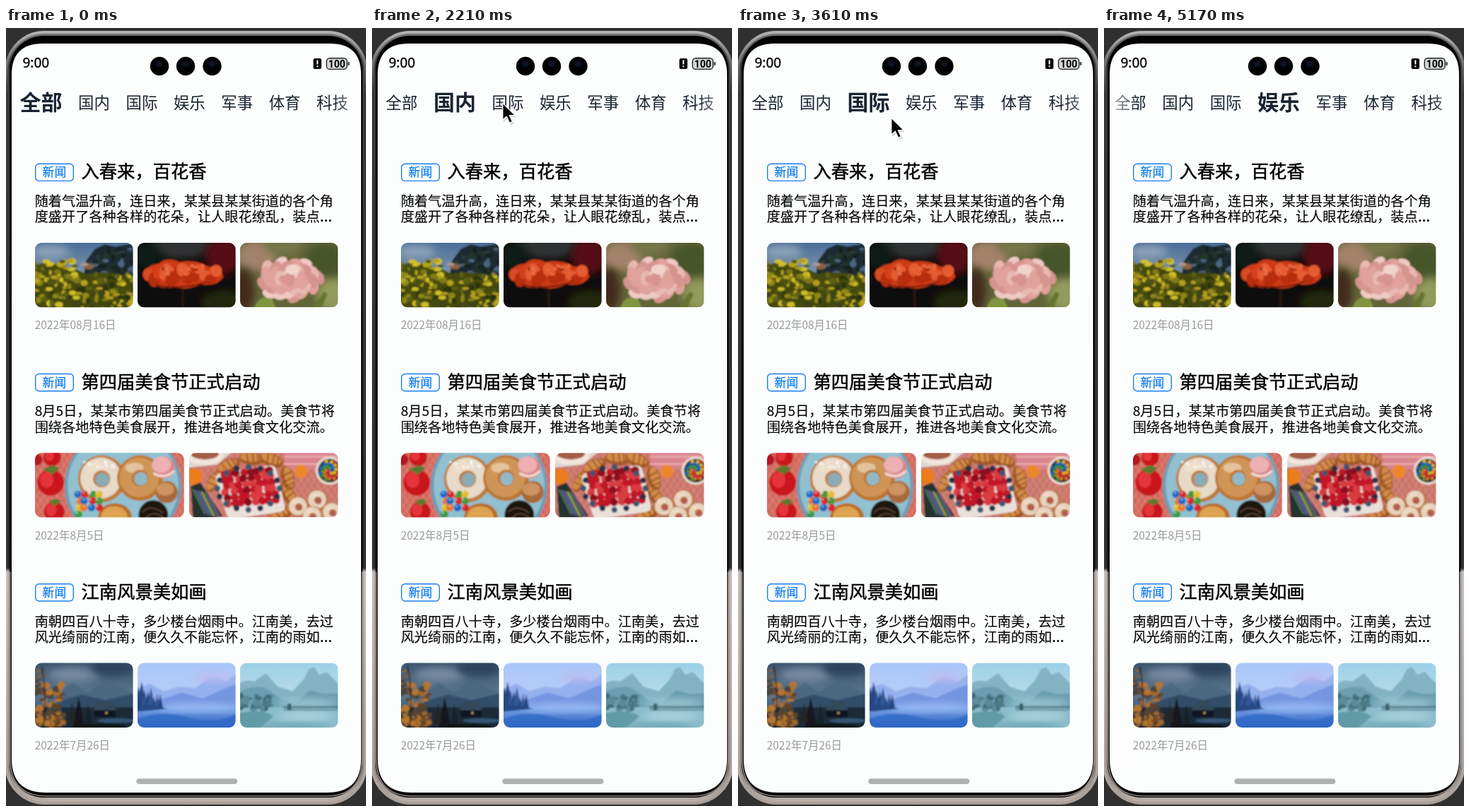
An HTML page for the animation above (5670 ms loop, 509 px wide and 1101 px high).

```html
<!DOCTYPE html>
<html lang="zh-CN">
<head>
<meta charset="utf-8">
<title>新闻</title>
<style>
html, body { margin: 0; width: 100%; height: 100%; overflow: hidden; background: #303030; }
svg { display: block; width: 509px; height: 1101px; }
text { font-family: "Noto Sans CJK SC", "Noto Sans CJK", sans-serif; white-space: pre; }
.title { font-size: 25.3px; stroke: #000; stroke-width: .5px; }
.body { font-size: 19.2px; fill: #060606; stroke: #060606; stroke-width: .15px; }
.dots { font-family: "Noto Sans", sans-serif; font-size: 22px; }
.date { font-size: 15.45px; fill: #999; }
.tag { font-size: 16.8px; fill: #0a7af0; stroke: #0a7af0; stroke-width: .25px; text-anchor: middle; }
.tab { font-size: 22.4px; fill: #182431; text-anchor: middle; }
.tab.on { font-size: 30px; font-weight: 700; }
</style>
</head>
<body>
<svg id="stage" viewBox="0 0 509 1101" xmlns="http://www.w3.org/2000/svg"></svg>
<script>
const LOOP = 5670, STEP = 40, PAGE = 493, BG = '#fcfefe';
const stage = document.getElementById('stage');

let seed = 7;
const next = () => (seed = (seed * 16807) % 2147483647) / 2147483647;
const rnd = (a, b) => +(a + (b - a) * next()).toFixed(2);
const pick = list => list[Math.floor(next() * list.length)];
const rect = (x, y, w, h, fill, more = '') =>
  `<rect x="${x}" y="${y}" width="${w}" height="${h}" fill="${fill}" ${more}/>`;
const oval = (x, y, rx, ry, fill, more = '') =>
  `<ellipse cx="${x}" cy="${y}" rx="${rx}" ry="${ry}" fill="${fill}" ${more}/>`;
const dot = (x, y, r, fill, more) => oval(x, y, r, r, fill, more);
const shape = (d, fill, more = '') => `<path d="${d}" fill="${fill}" ${more}/>`;
const line = (d, color, w) => shape(d, 'none', `stroke="${color}" stroke-width="${w}" stroke-linecap="round"`);
const text = (x, y, cls, s) => `<text x="${x}" y="${y}" class="${cls}">${s}</text>`;
const many = (n, f) => Array.from({ length: n }, (_, i) => f(i)).join('');
const soft = 'filter="url(#blur)"';
const ramp = (id, stops, dir = 'x2="0" y2="1"') =>
  `<linearGradient id="${id}" ${dir}>${stops.map(([o, c, a = 1]) =>
    `<stop offset="${o}" stop-color="${c}" stop-opacity="${a}"/>`).join('')}</linearGradient>`;
const scatter = (n, x0, x1, y0, y1, r0, r1, colors) =>
  many(n, () => oval(rnd(x0, x1), rnd(y0, y1), rnd(r0, r1), rnd(r0, r1) * .8, pick(colors)));
const pine = (x, y, h, fill) => shape(`M${x} ${y - h}l${h * .2} ${h}h${-h * .4}z`, fill);

function rapeseed() {
  return rect(0, 0, 139, 92, 'url(#sky)') +
    oval(24, 14, 26, 9, '#8ba2b8', soft) +
    shape('M66 62L72 26 84 10 97 4 112 7 139 2V62Z', '#1f2c30') +
    scatter(36, 78, 138, 6, 44, 2, 6, ['#16211f', '#2c3b3e', '#24342b', '#4d6680']) +
    shape('M0 38Q18 20 34 32 54 34 72 44 104 38 139 50V92H0Z', '#44480f') +
    scatter(130, 0, 139, 45, 91, 2, 6, ['#8f8718', '#b5a11e', '#cfbd29', '#5b5e17', '#2c360e', '#3d4413']) +
    scatter(45, 2, 62, 26, 56, 2, 6, ['#b3a41f', '#d3c12a', '#817a18', '#4b5114']) +
    oval(76, 34, 7, 4, '#8a6248') + oval(70, 31, 5, 2, '#b49a8c');
}

function poppy() {
  let petals = '';
  for (let i = 0; i < 13; i++) {
    const x = 18 + i * 7.6, y = 45 + 7 * Math.sin(i * 1.9);
    petals += oval(x, y, 8, 9 + 3 * Math.sin(i * .5), pick(['#d5401a', '#d94b22', '#b82e0e', '#e55c30']),
      `transform="rotate(${rnd(-35, 35)} ${x} ${y})"`);
  }
  return rect(0, 0, 139, 92, '#0d0a09') +
    oval(62, 6, 42, 18, '#2d3232', soft) + oval(118, 20, 24, 26, '#560f13', soft) +
    oval(120, 82, 32, 16, '#20260f', soft) + oval(16, 20, 18, 18, '#111b18', soft) +
    rect(62, 58, 4, 34, '#26170c') +
    shape('M10 46Q14 32 32 30 42 20 60 28 82 24 98 34 116 34 119 48 110 62 88 58 70 68 50 61 32 66 24 55 14 54 10 46Z', '#cc3b16') +
    petals + scatter(16, 34, 98, 32, 44, 2, 4, ['#ea7042', '#e65c33', '#a9290e']) +
    line('M28 59Q62 66 96 55', '#7b1b0a', 2);
}

function peony() {
  let petals = '';
  for (let i = 0; i < 36; i++) {
    const a = i * 2.4, r = 5.2 * Math.sqrt(i), x = 70 + r * Math.cos(a) * 1.3, y = 51 + r * Math.sin(a) * .85;
    petals = oval(x.toFixed(1), y.toFixed(1), 10, 7, pick(['#e9b9b1', '#e0a29b', '#efcbc3', '#d6948e']),
      `transform="rotate(${Math.round(a * 57 + 90)} ${x} ${y})"`) + petals;
  }
  return rect(0, 0, 139, 92, '#626539') +
    oval(25, 20, 28, 20, '#a2826a', soft) + oval(62, 6, 26, 13, '#74764a', soft) +
    oval(118, 26, 28, 24, '#46552a', soft) + oval(128, 72, 22, 22, '#929a5b', soft) +
    oval(8, 66, 14, 30, '#432a1d', soft) + shape('M22 92Q28 70 46 78L52 92Z', '#809541') +
    shape('M100 92L116 68 121 71 112 92Z', '#65752f') + petals +
    oval(74, 38, 10, 7, '#f2d3cb') + oval(64, 51, 9, 5, '#da9490');
}

const berry = (x, y, r) => dot(x, y, r, '#c8191f') + oval(x - r * .3, y - r * .2, r * .5, r * .6, '#e5353a') +
  shape(`M${x - r * .6} ${y - r}l${r * .7} ${r * .4} ${r * .6} ${-r * .5} ${-r * .6} ${-r * .2}z`, '#5b7a2d');
const ring = (x, y, r, dough, glaze, hole) => dot(x, y, r, dough) + dot(x - 1, y - 1, r * .87, glaze) +
  oval(x - r * .25, y - r * .45, r * .4, r * .22, '#f3e3cb', 'opacity=".6"') +
  dot(x, y, r * .36, dough) + dot(x + 1, y + 1, r * .29, hole);
const lattice = () => many(30, i => line(`M${i * 9 - 60} 0l60 92M${i * 9} 0l-60 92`, '#e39689', .8));
const candy = ['#1769c5', '#d6282c', '#3f9a3a', '#e5ba26', '#e8742a'];

function donuts() {
  return rect(0, 0, 211, 92, '#d5685d') + lattice() +
    dot(122, 47, 79, '#6b9db4') + dot(122, 46, 75, '#91c0d1') +
    berry(26, 8, 12) + berry(24, 42, 18) + berry(29, 82, 14) + dot(5, 11, 8, '#b61920') +
    ring(93, 37, 32, '#bf7c39', '#e7dac8', '#8aabb8') + ring(145, 36, 31, '#bd742e', '#ce9556', '#91b9c8') +
    scatter(25, 69, 118, 13, 22, .8, 2, ['#fff', '#eee5db']) +
    oval(177, 22, 15, 15, '#d8868e') + oval(174, 18, 13, 11, '#eeb0b2') + line('M164 30Q179 38 190 27', '#f4dfd4', 3) +
    dot(181, 55, 15, '#a7693a') + oval(179, 51, 12, 9, '#cd9361') +
    dot(163, 86, 20, '#1c1211') + line('M148 82Q160 71 176 83M153 90Q164 78 178 91', '#65483a', 1.5) +
    oval(111, 90, 23, 20, '#ba6c28') + oval(110, 88, 18, 14, '#dda351') +
    many(13, i => dot(62 + (i % 4) * 9 + rnd(-2, 2), 58 + Math.floor(i / 4) * 9, 5, candy[i % 5]) +
      dot(60 + (i % 4) * 9, 56 + Math.floor(i / 4) * 9, 1.2, '#fff', 'opacity=".6"'));
}

const roll = (x, y, a) => `<g transform="translate(${x} ${y}) rotate(${a})">` + oval(0, 0, 17, 9, '#a75d28') +
  oval(-1, -2, 14, 6, '#d28b48') + line('M-7 -7L-4 6M1 -8L4 7M8 -6L10 5', '#8b491d', 1.4) + '</g>';

function tarts() {
  let fruit = '';
  for (let r = 0; r < 6; r++) for (let c = 0; c < 8; c++)
    fruit += dot(49 + c * 9 + rnd(-2, 2) + r * 1.5, 31 + r * 8 - c * .8, 5.4, pick(['#c21828', '#8e0e1a', '#d93a40']));
  return rect(0, 0, 211, 92, '#c9746a') + lattice() +
    shape('M0 0H62L40 18 0 22Z', '#ded8d1') + oval(24, 5, 25, 13, '#f1e6dc') + oval(24, 3, 19, 8, '#a45b45') +
    rect(132, 0, 79, 24, '#d98590') + line('M132 7H211M132 17H211', '#edb0ac', 2) +
    dot(10, 34, 11, '#ec7d1a') + dot(154, 27, 9, '#ee862a') +
    shape('M5 47L18 42 48 87 30 92H8Z', '#25322f') +
    many(6, i => line(`M${8 + i * 4} ${52 + i}l16 32`, ['#3f8064', '#81599b', '#397cab', '#c0a747'][i % 4], 2)) +
    roll(38, 40, -55) + roll(56, 20, -25) + roll(87, 10, 5) + roll(114, 12, 20) + roll(137, 58, 60) + roll(136, 36, 75) + roll(128, 84, -20) +
    shape('M46 29L111 19Q119 18 121 26L132 73Q134 80 125 82L63 91Q56 92 53 84L39 38Q38 31 46 29Z', '#e9e0db') + fruit +
    many(16, i => dot(83 + 42 * Math.cos(i * .393), 50 + 29 * Math.sin(i * .393), 4, i % 2 ? '#243347' : '#3d5470')) +
    dot(193, 26, 19, '#ecdfd3') + dot(193, 26, 16, '#28372d') +
    many(32, i => dot(193 + 2.5 * Math.sqrt(i) * Math.cos(i * 2.4), 26 + 2.5 * Math.sqrt(i) * Math.sin(i * 2.4), 2.3, candy[i % 5])) +
    [[151, 75], [177, 66], [170, 88], [197, 83]].map(([x, y]) => ring(x, y, 14, '#b9743c', '#e7d2bd', '#b35a50')).join('');
}

function cabin() {
  return rect(0, 0, 139, 92, 'url(#dusk)') +
    oval(55, 18, 35, 10, '#7489a0', soft) + oval(108, 9, 30, 10, '#2a435c', soft) +
    shape('M22 52L54 29 74 42 100 25 139 45V66H22Z', '#4b6880') +
    shape('M34 54L66 45 98 52 139 43V65H34Z', '#304d68') + rect(0, 62, 139, 30, '#1b2a39') +
    scatter(85, 0, 42, 30, 89, 2, 6, ['#a06a2d', '#7b4a22', '#b5762f', '#5f4326', '#4a453d']) +
    scatter(18, 0, 16, 8, 42, 1, 4, ['#7d6548', '#6d5a47', '#43464c']) +
    line('M14 92Q20 50 12 6', '#29272a', 1.4) +
    pine(62, 90, 42, '#13191d') + pine(75, 84, 26, '#18242b') + pine(53, 82, 26, '#202620') +
    shape('M82 66L91 54H105L112 66V75H84Z', '#111820') + shape('M81 66L91 54H106L113 66Z', '#344858') +
    rect(98, 68, 3, 3, '#c79c55') + oval(113, 80, 26, 3, '#355575') + oval(92, 88, 34, 4, '#0c1218');
}

function lake() {
  return rect(0, 0, 139, 92, 'url(#azure)') +
    shape('M0 37L20 30 38 40 58 34 80 36 104 19 122 27 139 15V65H0Z', '#8eaaeb', 'opacity=".8"') +
    oval(105, 21, 26, 6, '#bdbaf0', soft) +
    shape('M30 53L62 42 92 50 117 38 139 30V64H30Z', '#6f91de', 'opacity=".85"') + rect(0, 61, 139, 31, 'url(#deep)') +
    oval(85, 62, 55, 5, '#9dbef3', soft) + shape('M0 92V79Q30 65 70 75T139 70V92Z', '#3069c8', 'opacity=".8"') +
    many(9, i => pine(i * 4.2, 64, 36 - i * 2.4 + 6 * Math.sin(i * 4), i % 2 ? '#315797' : '#264781')) +
    shape('M0 59Q22 58 43 64L0 68Z', '#284984');
}

function bridge() {
  return rect(0, 0, 139, 92, 'url(#mist)') +
    shape('M0 31Q9 23 22 27L38 16 54 34 74 40 89 24 96 10 103 7 110 18 120 14 139 33V64H0Z', '#83b2c3') +
    shape('M0 42Q18 31 38 36L60 52 79 55 98 39 116 44 139 43V63H0Z', '#6a9eb0') +
    oval(92, 57, 42, 6, '#9cc8d4', soft) + rect(0, 62, 139, 30, '#8bbccb') + oval(91, 74, 38, 7, '#a7d2dc', soft) +
    scatter(40, 0, 44, 46, 65, 2, 6, ['#4b7987', '#3f6c79', '#5c8b97']) +
    line('M62 62H139', '#3c606f', 1.4) + line('M63 66H139', '#63919d', 1) +
    many(26, i => line(`M${63 + i * 3} 60v6`, '#3c606f', .8)) + rect(67, 57, 5, 9, '#3c606f') +
    shape('M0 70Q34 63 48 74L28 92H0Z', '#609ba6') + oval(75, 89, 50, 5, '#6ba1af', soft);
}

const thirds = [[41, 139], [186, 139], [331, 138.5]];
const halves = [[41, 211], [259, 210.5]];
const ELL = '<tspan class="dots">…</tspan>';
const cards = [
  ['入春来，百花香', '随着气温升高，连日来，某某县某某街道的各个角', '度盛开了各种各样的花朵，让人眼花缭乱，装点' + ELL,
    '2022年08月16日', thirds, [rapeseed, poppy, peony]],
  ['第四届美食节正式启动', '8月5日，某某市第四届美食节正式启动。美食节将', '围绕各地特色美食展开，推进各地美食文化交流。',
    '2022年8月5日', halves, [donuts, tarts]],
  ['江南风景美如画', '南朝四百八十寺，多少楼台烟雨中。江南美，去过', '风光绮丽的江南，便久久不能忘怀，江南的雨如' + ELL,
    '2022年7月26日', thirds, [cabin, lake, bridge]]
];
// art is drawn slightly oversize so its softened edge falls outside the clip
const photo = ([x, w], art, kind) =>
  `<svg x="${x}" y="304" width="${w}" height="91.3"><g clip-path="url(#c${kind})">` +
  `<g transform="translate(-3 -2) scale(1.045)" filter="url(#haze)">${art()}</g></g></svg>`;
const card = ([title, a, b, date, slots, art], i) =>
  `<g transform="translate(0 ${i * 297.3})">` +
  rect(41.7, 192.2, 53.6, 24.2, 'none', 'rx="5" stroke="#1a7ff2" stroke-width="1.4"') +
  text(68.4, 210.3, 'tag', '新闻') + text(106.5, 212.3, 'title', title) +
  text(40.7, 252, 'body', a) + text(40.7, 274.3, 'body', b) +
  slots.map((slot, k) => photo(slot, art[k], slots.length)).join('') +
  text(40.7, 426.3, 'date', date) + '</g>';

const screen = 'M8 66Q8 22 52 22H458Q502 22 502 66V1034Q502 1082 454 1082H56Q8 1082 8 1034Z';
const tabs = ['全部', '国内', '国际', '娱乐', '军事', '体育', '科技'];

stage.innerHTML = '<defs>' +
  '<filter id="blur" x="-40%" y="-40%" width="180%" height="180%"><feGaussianBlur stdDeviation="5"/></filter>' +
  '<filter id="haze" x="-5%" y="-5%" width="110%" height="110%"><feGaussianBlur stdDeviation=".8"/></filter>' +
  ramp('sky', [[0, '#486b97'], [.5, '#8299ab'], [1, '#65712f']]) +
  ramp('dusk', [[0, '#3b546c'], [.5, '#5b778e'], [1, '#1e2e3e']]) +
  ramp('azure', [[0, '#a9c6fa'], [.5, '#b7cdf8'], [1, '#648edc']]) +
  ramp('deep', [[0, '#7ba5ec'], [1, '#275ab4']]) +
  ramp('mist', [[0, '#9bd0e9'], [.5, '#b8dce6'], [1, '#76adbb']]) +
  ramp('metal', [[0, '#777'], [.04, '#3c3c3c'], [.695, '#252525'], [.7, '#b1aaa6'], [.96, '#918783'], [1, '#bbb2ac']]) +
  ramp('rim', [[0, '#b1b1b1'], [.035, '#777'], [.08, '#3a3a3a'], [.695, '#383838'], [.7, '#cbc4c0'], [1, '#aaa09a']]) +
  ramp('fadeL', [[0, BG, .7], [1, BG, 0]], '') + ramp('fadeR', [[0, BG, 0], [1, BG, .7]], '') +
  `<clipPath id="c3">${rect(0, 0, 138.6, 91.3, '#000', 'rx="9"')}</clipPath>` +
  `<clipPath id="c2">${rect(0, 0, 210.7, 91.3, '#000', 'rx="9"')}</clipPath>` +
  `<clipPath id="view"><path d="${screen}"/></clipPath></defs>` +
  rect(0, 0, 509, 1101, '#303030') +
  rect(.5, 6, 508, 1091, 'url(#metal)', 'rx="54" stroke="url(#rim)" stroke-width="4"') +
  rect(5, 11, 499, 1078, '#020202', 'rx="48"') +
  line('M6 770V1034Q6 1087 58 1087H452Q503.5 1087 503.5 1034V770', '#8e8580', 1.5) +
  shape(screen, BG) +
  `<g clip-path="url(#view)"><g id="pages"><g id="page">${cards.map(card).join('')}</g><use href="#page" x="${PAGE}"/></g>` +
  `<g id="tabs">${tabs.map(s => text(0, 0, 'tab', s)).join('')}</g>` +
  rect(8, 85, 40, 45, 'url(#fadeL)', 'id="left"') + rect(462, 85, 40, 45, 'url(#fadeR)') + '</g>' +
  '<text x="23.5" y="56.3" style="font:500 19px \'Noto Sans\',sans-serif" stroke="#000" stroke-width=".3">9:00</text>' +
  [217, 254, 291.5].map(x => dot(x, 54, 13.2, '#020202') + oval(x, 51, 5, 4, '#0b1422')).join('') +
  rect(434.5, 43, 11.5, 15, '#080808', 'rx="2.5"') + rect(439.3, 45.5, 2, 6, '#fff') + rect(439.3, 53.3, 2, 2, '#fff') +
  rect(453.2, 42.8, 29, 15.6, '#d5d7d7', 'rx="4.5" stroke="#222" stroke-width="1.4"') + rect(483.6, 48, 2, 5, '#222', 'rx="1"') +
  '<text x="467.7" y="55.5" text-anchor="middle" style="font:700 14px Roboto,sans-serif">100</text>' +
  rect(184.3, 1062.3, 143, 7.6, '#b0b1b1', 'rx="3.8"') +
  '<g id="cursor">' +
  shape('M2 3V28L8 23 12 32 17 30 13 21H20Z', '#000', 'opacity=".18"') +
  shape('M.7 1V25.2L6.3 20.2 10.5 29.5 14.6 27.7 10.5 18.6H18.3Z', '#050505', 'stroke="#fff" stroke-width="1.4" stroke-linejoin="round"') +
  '</g>';

// first visible moment and spring start of each page change
const slides = [[1490, 1447], [3210, 3152], [4370, 4294]];
const SETTLE = 400;
const track = [
  [250, -4, 925], [410, 138, 772], [530, 218, 608], [650, 196, 438], [810, 188, 191],
  [970, 180, 142], [1130, 160, 121], [1290, 134, 117], [1410, 124, 106], [1650, 124, 106],
  [1850, 158, 110], [2050, 184, 104], [2170, 184, 104], [2210, 184, 105], [3250, 184, 105],
  [3450, 197, 118], [3610, 216, 126], [3770, 228, 112], [4010, 246, 107], [4210, 256, 101],
  [4530, 257, 101], [4690, 289, 190], [4850, 320, 307], [5010, 320, 307], [5050, 262, 410],
  [5090, 160, 545], [5130, 22, 697]
];
const $ = id => document.getElementById(id);
const labels = [...$('tabs').children];

function spring(ms) {
  const t = ms / 1000, w = 6.24;
  return 1 - Math.exp(-17 * t) * (Math.cos(w * t) + 17 / w * Math.sin(w * t));
}

function pointer(t) {
  const i = track.findIndex(k => k[0] > t);
  if (i === 0 || t >= 5170) return null;
  if (i < 0) return track[track.length - 1].slice(1);
  const [a, x, y] = track[i - 1], [b, u, v] = track[i], k = (t - a) / (b - a);
  return [x + (u - x) * k, y + (v - y) * k];
}

function draw(now) {
  const t = Math.floor((now % LOOP - 10) / STEP) * STEP + 10;
  let p = 0, sel = 0, scroll = 0;
  slides.forEach(([from, start], i) => {
    if (t < from) return;
    p = spring(t - start);
    if (t >= start + SETTLE) sel = i + 1;
    if (i === 2) scroll = p;
  });
  if (p > .9995) p = 1;
  $('pages').setAttribute('transform', `translate(${-p * PAGE} 0)`);
  labels.forEach((el, i) => {
    const on = i === sel;
    el.setAttribute('class', on ? 'tab on' : 'tab');
    el.setAttribute('x', 42 + 67.4 * i + (on ? 7.6 : i > sel ? 15.1 : 0) - 4.7 * scroll);
    el.setAttribute('y', on ? 116.3 : 113.6);
  });
  $('left').setAttribute('opacity', scroll);
  const at = pointer(t);
  $('cursor').setAttribute('visibility', at ? 'visible' : 'hidden');
  if (at) $('cursor').setAttribute('transform', `translate(${at[0]} ${at[1]})`);
}

const t0 = performance.now();
function tick() {
  draw(performance.now() - t0);
  requestAnimationFrame(tick);
}
tick();
</script>
</body>
</html>
```
